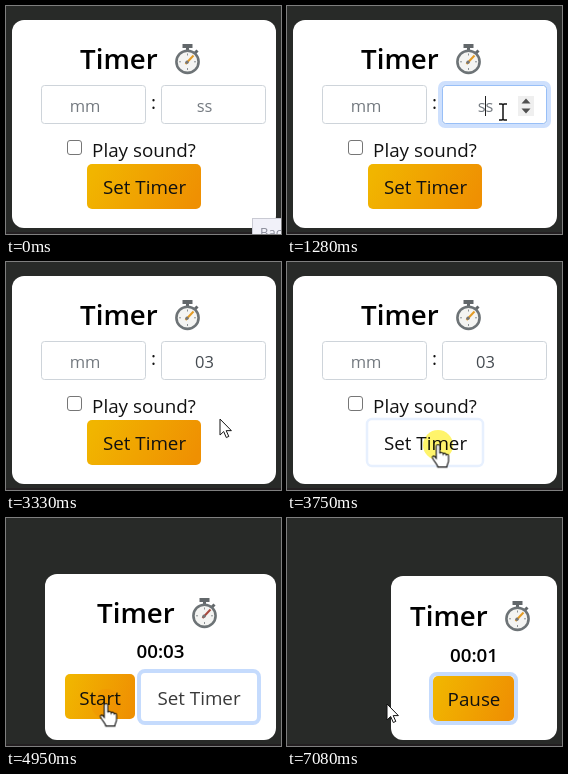
These frames come from a looping animation (275 by 228 pixels, 8 s). An HTML page:

```html
<!DOCTYPE html>
<html lang="en">
<head>
<meta charset="utf-8">
<title>Timer</title>
<style>
html, body { margin: 0; width: 100%; height: 100%; overflow: hidden; background: #282a28; }
svg { display: block; width: 275px; height: 228px; }
text { font: 18.8px "Open Sans", "Noto Sans", sans-serif; fill: #111; text-anchor: middle; }
.title { font-size: 27.7px; font-weight: 600; fill: #000; text-anchor: start; }
.count { font-weight: 600; fill: #000; }
.field { font-size: 16.5px; fill: #444a50; }
.hint { fill: #747a80; }
.card { fill: #fff; }
.box { fill: #fff; stroke: #ced4da; }
.gold { fill: url(#gold); }
.ring { fill: none; stroke: #c5dbfd; stroke-width: 4; }
.halo { fill: #fff24a; mix-blend-mode: multiply; opacity: .82; }

/* Every animation shares one 8 s clock: 1% = 80 ms. */
.step, .fade, .move { animation: 8s linear infinite; }
.step { animation-timing-function: step-end; }

.note { animation-name: note; }
.setup { animation-name: setup; }
.ready { animation-name: ready; }
.running { animation-name: running; }
.empty { animation-name: empty; }
.one-digit { animation-name: one-digit; }
.two-digits { animation-name: two-digits; }
.caret { animation-name: caret; }
.spinner { animation-name: spinner; }
.three { animation-name: three; }
.two { animation-name: two; }
.one { animation-name: one; }
.arrow { animation-name: arrow; }
.beam { animation-name: beam; }
.hand { animation-name: hand; }
.press { animation-name: press; }
.field-focus { animation-name: field-focus; }
.hover { animation-name: hover; }
.set-focus { animation-name: set-focus; }
.ready-focus { animation-name: ready-focus; }
.pause-focus { animation-name: pause-focus; }
.pointer { animation-name: pointer; }

@keyframes note { 0% { visibility: visible } .875%, 100% { visibility: hidden } }
@keyframes setup { 0% { visibility: visible } 47.75%, 100% { visibility: hidden } }
@keyframes ready { 0%, 62.75%, 100% { visibility: hidden } 47.75% { visibility: visible } }
@keyframes running { 0% { visibility: hidden } 62.75%, 100% { visibility: visible } }
@keyframes empty { 0% { opacity: 1 } 19.375%, 100% { opacity: 0 } }
@keyframes one-digit { 0%, 22.625%, 100% { opacity: 0 } 19.375% { opacity: 1 } }
@keyframes two-digits { 0% { opacity: 0 } 22.625%, 100% { opacity: 1 } }
@keyframes caret {
  0% { opacity: 0; transform: none }
  15.25% { opacity: 1; transform: none }
  19.375% { opacity: 1; transform: translateX(5px) }
  22.625% { opacity: 1; transform: translateX(10px) }
  28.875%, 100% { opacity: 0; transform: none }
}
@keyframes spinner { 0%, 26%, 100% { opacity: 0 } 12.4% { opacity: 1 } }
@keyframes three { 0% { opacity: 1 } 76.125%, 100% { opacity: 0 } }
@keyframes two { 0%, 88.5%, 100% { opacity: 0 } 76.125% { opacity: 1 } }
@keyframes one { 0% { opacity: 0 } 88.5%, 100% { opacity: 1 } }
@keyframes arrow { 0%, 26%, 62.75%, 100% { opacity: 1 } 12.4%, 44.3% { opacity: 0 } }
@keyframes beam { 0%, 26%, 100% { opacity: 0 } 12.4% { opacity: 1 } }
@keyframes hand { 0%, 62.75%, 100% { opacity: 0 } 44.3% { opacity: 1 } }
@keyframes press {
  0%, 32.4%, 48%, 63.6%, 100% { opacity: 0 }
  30.5%, 45.9%, 61.875% { opacity: .82 }
}
@keyframes field-focus { 0%, 15%, 33.2%, 100% { opacity: 0 } 16.2%, 31.75% { opacity: 1 } }
@keyframes hover { 0%, 44.3% { opacity: 0 } 46.2%, 100% { opacity: 1 } }
@keyframes set-focus { 0%, 46.3% { opacity: 0 } 46.875% { opacity: .4 } 47.75%, 100% { opacity: .8 } }
@keyframes ready-focus { 0%, 47.75% { opacity: .5 } 49.3%, 100% { opacity: 1 } }
@keyframes pause-focus { 0%, 62.75% { opacity: 0 } 65.3%, 100% { opacity: 1 } }
@keyframes pointer {
  0%, 6.6% { transform: translate(278px, 230px); animation-timing-function: ease-out }
  13.5%, 23.5% { transform: translate(216px, 106px); animation-timing-function: ease-in-out }
  31%, 41.6% { transform: translate(214px, 157px); animation-timing-function: ease-in-out }
  45.5%, 47.75% { transform: translate(151px, 183px) }
  49.3%, 55.1% { transform: translate(146px, 184px); animation-timing-function: ease-in-out }
  58.6%, 100% { transform: translate(100px, 186px) }
}
</style>
</head>
<body>
<svg viewBox="0 0 275 228">
  <defs>
    <linearGradient id="gold" x1="0" y1=".4" x2="1" y2=".6">
      <stop stop-color="#f1b500"/>
      <stop offset="1" stop-color="#ef9002"/>
    </linearGradient>
    <g id="heading">
      <text class="title" x="74" y="63">Timer</text>
      <path d="M176.5 38h10v4h-10z" fill="#62676a"/>
      <path d="M181.5 41v4M191.500 44.500l-3 3" stroke="#62676a" stroke-width="3"/>
      <circle cx="181.5" cy="55.8" r="11.1" fill="#f4f4f2" stroke="#6d7376" stroke-width="2.6"/>
      <path d="M181.5 47.500v2M181.5 62v2M173 55.8h2M188 55.8h2" stroke="#8b9093"/>
      <path d="M179.5 58l8-8.500" style="stroke: var(--needle, #e39a24)" stroke-width="2"/>
      <circle cx="181" cy="56.3" r="1.7" fill="#777"/>
    </g>
  </defs>

  <rect width="275" height="228" fill="#282a28"/>
  <rect y="226" width="275" height="2" fill="#231f21"/>

  <g class="step setup">
    <rect class="card" x="6" y="14" width="264" height="208" rx="12"/>
    <use href="#heading"/>
    <rect class="box" x="35.5" y="79.5" width="104" height="38" rx="3"/>
    <text class="field hint" x="79" y="106">mm</text>
    <text x="147.5" y="103">:</text>
    <rect class="box" x="155.5" y="79.5" width="104" height="38" rx="3"/>
    <g class="fade field-focus">
      <rect class="ring" x="153" y="77" width="109" height="43" rx="5"/>
      <rect x="155.5" y="79.5" width="104" height="38" rx="3" fill="none" stroke="#8fbcfd"/>
    </g>
    <text class="field hint step empty" x="198.5" y="106">ss</text>
    <text class="field step one-digit" x="198.5" y="106">0</text>
    <text class="field step two-digits" x="198.5" y="106">03</text>
    <path class="step caret" d="M198.5 90v20" stroke="#222"/>
    <g class="step spinner">
      <rect x="231" y="90" width="16" height="20" fill="#efefef"/>
      <path d="M234.5 97.5l4.5-5 4.5 5zM234.5 102.5l4.5 5 4.5-5z" fill="#505050"/>
    </g>
    <rect x="61.5" y="134.5" width="14" height="14" rx="2.5" fill="#fff" stroke="#767676"/>
    <text x="138" y="151">Play sound?</text>
    <rect class="gold" x="81" y="158" width="114" height="45" rx="5"/>
    <rect class="card fade hover" x="80" y="157" width="116" height="47" rx="5"/>
    <rect class="ring fade set-focus" x="80" y="157" width="116" height="47" rx="5" style="stroke-width: 2.5px"/>
    <text x="138.5" y="188">Set Timer</text>
  </g>

  <g class="step ready">
    <rect class="card" x="39" y="56" width="231" height="166" rx="12"/>
    <use href="#heading" x="17" y="42" style="--needle: #a8483c"/>
    <text class="count" x="154.5" y="140">00:03</text>
    <rect class="gold" x="59" y="156" width="70" height="45" rx="5"/>
    <text x="94" y="187">Start</text>
    <rect class="ring fade ready-focus" x="133" y="153" width="120" height="52" rx="6"/>
    <text x="193" y="187" style="fill: #3a3a3a">Set Timer</text>
  </g>

  <g class="step running">
    <rect class="card" x="104" y="58" width="166" height="164" rx="12"/>
    <use href="#heading" x="49" y="45"/>
    <text class="count step three" x="187" y="144">00:03</text>
    <text class="count step two" x="187" y="144">00:02</text>
    <text class="count step one" x="187" y="144">00:01</text>
    <rect class="ring fade pause-focus" x="144" y="156" width="85" height="49" rx="6"/>
    <rect class="gold" x="146" y="158" width="81" height="45" rx="5"/>
    <text x="187" y="188">Pause</text>
  </g>

  <g class="step note">
    <rect x="246.5" y="212.5" width="40" height="30" fill="#f1f1f9" stroke="#c9cad3"/>
    <text x="254" y="231" style="font-size: 13px; fill: #8a8c99; text-anchor: start">Bac</text>
  </g>

  <g class="move pointer">
    <circle class="halo step press" r="15"/>
    <path class="step arrow" d="M0 0v16l3.7-3.5 2.6 6 2.5-1.1-2.6-5.8h5.2z" fill="#fff" stroke="#111"/>
    <path class="step beam" d="M-4-8h3l1 1 1-1h3M0-7v14M-4 8h3l1-1 1 1h3" fill="none" stroke="#111" stroke-width="1.5"/>
    <path class="step hand" transform="scale(.94)" d="M-1.9 1.6a1.9 1.9 0 0 1 3.8 0V9c.4-1.6 3.3-1.4 3.5.6.6-1.3 3-1 3.2.9.8-.9 2.6-.5 2.6 1.2V17c0 2.5-1.8 3.3-1.8 6.5H-.2c-.3-3-3.5-5.2-5.6-9.5-.9-2 1.4-3 2.6-1.4l1.3 1.6z" fill="#fff" stroke="#111" stroke-width="1.2"/>
  </g>
</svg>
</body>
</html>
```
